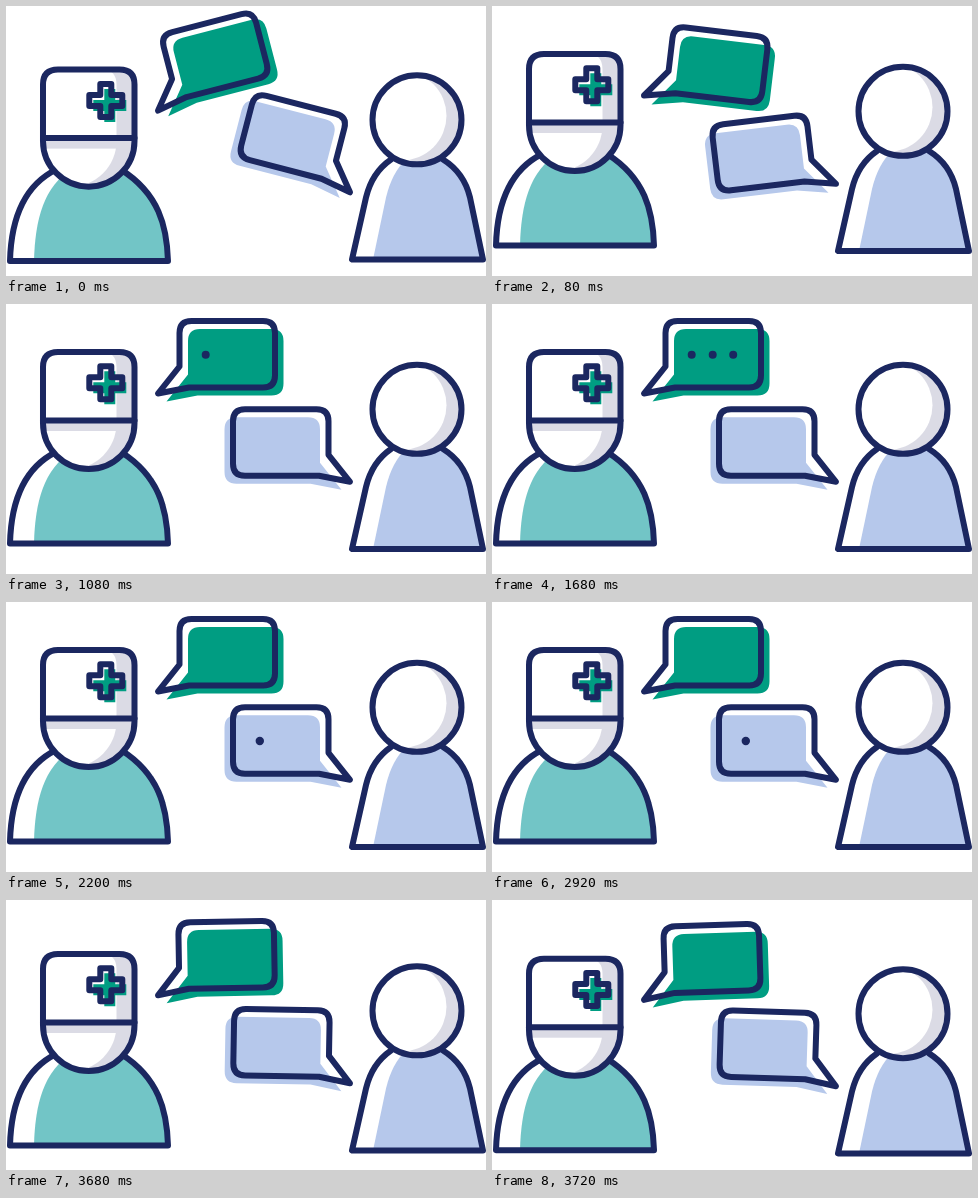
Write an HTML page that moves like this. It is 480x270 px and loops after 3760 ms.

```html
<!DOCTYPE html>
<html lang="en">
<head>
<meta charset="utf-8">
<title>Consultation</title>
<style>
  html, body { margin: 0; height: 100%; overflow: hidden; background: #fff; }
  svg { display: block; width: 100vw; height: 100vh; }
  .line { fill: none; stroke: #1b2760; stroke-width: 6; stroke-linecap: round; stroke-linejoin: round; }
  .dot { fill: #1b2760; }
  .shade { fill: #dbdbe5; }
  .white { fill: #fff; }
</style>
</head>
<body>
<svg viewBox="0 0 480 270">
  <defs>
    <!-- speech bubble with its tail tip at the origin -->
    <path id="bubble" d="M0 0L21.5 -27V-60.5Q21.5 -72.5 33.5 -72.5H105Q117 -72.5 117 -60.5V-18Q117 -6 105 -6H31Z"/>
    <path id="head" d="M37 63Q37 48 52 48H113.5Q128.5 48 128.5 63V119.3A45.75 45.75 0 0 1 37 119.3Z"/>
    <path id="cross" d="M94.3 62.3h11v11h11v11h-11v11h-11v-11h-11v-11h11z"/>
    <circle id="face" cx="411" cy="105.3" r="44.5"/>
    <clipPath id="headClip"><use href="#head"/></clipPath>
    <clipPath id="faceClip"><use href="#face"/></clipPath>
  </defs>

  <g id="doctor">
    <path fill="#72c5c6" d="M28 239.5H162C161 205 153 172 115 148H66C38 164 29 198 28 239.5Z"/>
    <path class="line" d="M50 148C16 165 5 200 4 239.5H162C161 205 153 172 115 148"/>
    <g clip-path="url(#headClip)">
      <use href="#head" class="shade"/>
      <use href="#head" class="white" x="-18"/>
      <rect class="shade" x="40" y="117" width="72" height="10"/>
    </g>
    <use href="#cross" fill="#009d82" x="4" y="5"/>
    <use href="#cross" class="line"/>
    <use href="#head" class="line"/>
    <path class="line" d="M37 116.5H128.5"/>
  </g>

  <g id="patient">
    <path fill="#b6c8eb" d="M367 245H477L464 183Q458 158 437 145H400Q386 158 380 183Z"/>
    <path class="line" d="M385 145Q366 158 360 183L346 245H477L464 183Q458 158 437 145"/>
    <g clip-path="url(#faceClip)">
      <use href="#face" class="shade"/>
      <use href="#face" class="white" x="-15" y="-4"/>
    </g>
    <use href="#face" class="line"/>
  </g>

  <g id="question">
    <use href="#bubble" fill="#009d82" x="8.5" y="8"/>
    <use href="#bubble" class="line"/>
  </g>
  <g id="answer">
    <use href="#bubble" fill="#b6c8eb" x="8.5" y="8"/>
    <use href="#bubble" class="line"/>
  </g>

  <g id="questionDots" class="dot">
    <circle cx="199.7" cy="50.8" r="4"/><circle cx="220.7" cy="50.8" r="4"/><circle cx="241.2" cy="50.8" r="4"/>
  </g>
  <g id="answerDots" class="dot">
    <circle cx="253.8" cy="139" r="4.2"/><circle cx="274.8" cy="139" r="4.2"/><circle cx="295.5" cy="139" r="4.2"/>
  </g>
</svg>
<script>
const LOOP = 3760, STEP = 40, CYCLE = 360;
const $ = id => document.getElementById(id);

// step from the loop start: [doctor drop, patient drop, bubble tilt]
const bounce = {
  '-4': [0.3, 0.2, 0], '-3': [2, 2, -0.4], '-2': [6, 5.5, -1], '-1': [10.7, 8.4, -1.8],
  0: [15.6, 8.5, -14.5], 1: [7, 4, -4], 2: [0, 0, 6.8], 3: [0, 0, 3.4]
};

// Dots come in one by one, then drop back to the first until the end.
function dotCount(t, start, end, thirdDelay) {
  if (t < start || t >= end) return 0;
  if (t < start + 120) return 1;
  const phase = (t - start - 120) % CYCLE;
  return phase < thirdDelay ? 2 : phase < 200 ? 3 : 1;
}

function showDots(id, count) {
  [...$(id).children].forEach((dot, i) => dot.style.display = i < count ? '' : 'none');
}

function move(id, transform) {
  $(id).setAttribute('transform', transform);
}

function draw() {
  const step = Math.floor(performance.now() % LOOP / STEP);
  const t = step * STEP;
  const last = LOOP / STEP;
  const [down, patientDown, tilt] = bounce[step < last / 2 ? step : step - last] || [0, 0, 0];

  move('doctor', `translate(0 ${down})`);
  move('patient', `translate(0 ${patientDown})`);
  move('question', `translate(152 ${89.5 + down * 0.97}) rotate(${tilt})`);
  move('answer', `translate(344 ${177.8 + patientDown}) scale(-1 1) rotate(${tilt})`);

  showDots('questionDots', dotCount(t, 400, 1800, 80));
  showDots('answerDots', dotCount(t, 1880, 3280, 40));
  requestAnimationFrame(draw);
}
draw();
</script>
</body>
</html>
```
